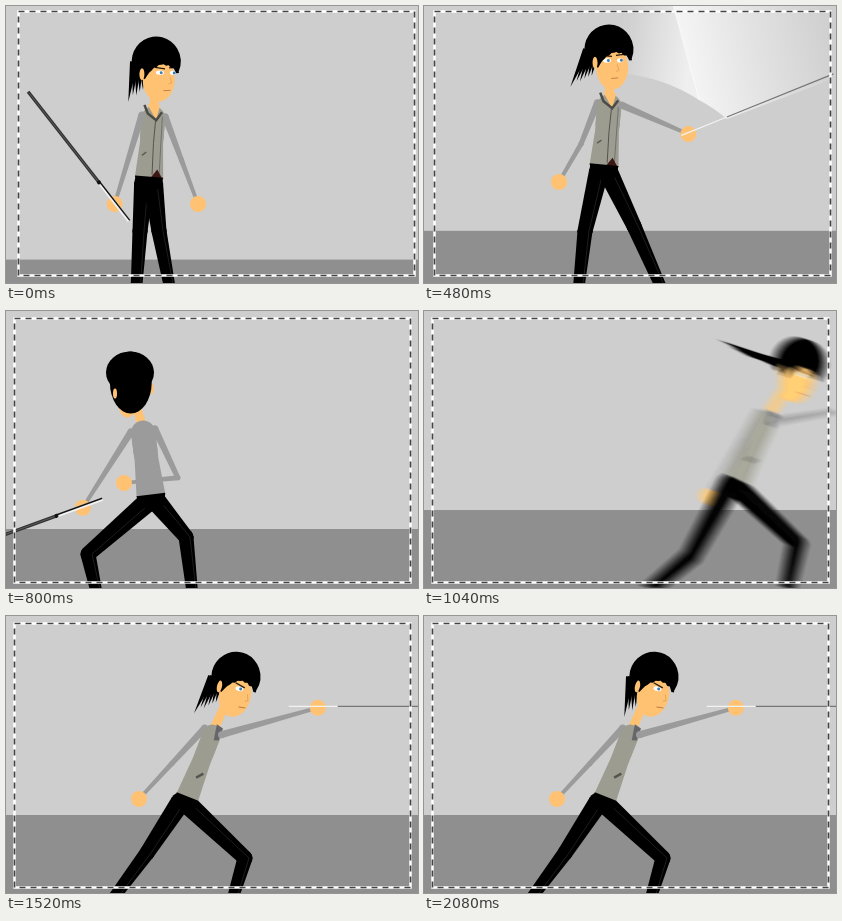
Animation, 412 px wide and 277 px high, one loop 2480 ms. Source, as an HTML page with a canvas:

```html
<!DOCTYPE html>
<html lang="en">
<head>
<meta charset="utf-8">
<title>Sword drill</title>
<style>
html, body { margin: 0; width: 100%; height: 100%; overflow: hidden; background: #cecece; }
canvas { display: block; }
</style>
</head>
<body>
<canvas id="stage" width="412" height="277"></canvas>
<script>
const W = 412, H = 277, LOOP = 2480, STEP = 80, LAST = 2080;
const SKIN = '#ffc273', INK = '#000', SLEEVE = '#9b9b9b', VEST = '#9c9c90', FLOOR = '#8f8f8f', BACK = '#cecece';
const THRUST = 1040;

const newLayer = () => Object.assign(document.createElement('canvas'), { width: W, height: H }).getContext('2d');
const stage = document.getElementById('stage').getContext('2d');
const body = newLayer(), smear = newLayer();
let c = body;

// side: which shoulder holds the sword; nod: forward lean of the head;
// arm: angle, reach; legs: knee x, y, foot x
const poses = [
  { t: 0, neck: [148, 103], waist: [143, 172], nod: 2, side: -1, arm: [107, 93], hand: [192, 198],
    left: [134, 225, 130], right: [153, 225, 165], blade: 232, floor: 253.6, tail: 94 },
  { t: 240, away: true, neck: [151, 84], waist: [151, 157], nod: 11, side: -1, arm: [125.5, 95], hand: [246, 112],
    left: [146, 215, 143], right: [222, 193, 198], blade: 155, floor: 290, tail: 94 },
  { t: 480, neck: [186, 91], waist: [180, 160], nod: -1, side: 1, arm: [383.5, 73], hand: [135, 176],
    left: [161, 225, 154], right: [210, 220, 240], blade: 338, floor: 224.8, tail: 110 },
  { t: 800, away: true, neck: [136, 112], waist: [145, 185], nod: -12, side: -1, arm: [482.4, 90], hand: [118, 172],
    left: [82, 243, 92], right: [180, 226, 187], blade: 520, floor: 218, tail: 100 },
  { t: THRUST, neck: [347, 99], waist: [313, 170], nod: 26, side: 1, arm: [351, 74], hand: [285, 186],
    left: [267, 245, 215], right: [373, 232, 361], blade: 360, floor: 199, tail: 198 },
  { t: 1520, neck: [210, 108], waist: [181, 182], nod: 18, side: 1, arm: [344.4, 100], hand: [133, 183],
    left: [141, 237, 103], right: [239, 242, 225], blade: 360, floor: 199, tail: 112 }
];

const mix = (a, b, k) => Array.isArray(a) ? a.map((v, i) => mix(v, b[i], k)) : a + (b - a) * k;
const clamp = (v, lo = 0, hi = 1) => Math.max(lo, Math.min(hi, v));
const ramp = (t, from, to) => clamp((t - from) / (to - from));
const rad = d => d * Math.PI / 180;
const polar = (d, r) => [Math.cos(rad(d)) * r, Math.sin(rad(d)) * r];
const rnd = i => Math.abs(Math.sin(i * 12.9898) * 43758.5453) % 1;

function poseAt(t) {
  const i = clamp(poses.findLastIndex(p => p.t <= t), 0, poses.length - 2);
  const a = poses[i], b = poses[i + 1];
  let k = ramp(t, a.t, b.t);
  const away = (k < 0.5 ? a : b).away;
  if (a.t === THRUST) k = 1 - (1 - k) ** 3;
  const p = { t, away };
  for (const key in a) if (key !== 't' && key !== 'away') p[key] = mix(a[key], b[key], k);
  p.tail -= 18 * ramp(t, 1680, LAST);
  p.profile = clamp(p.nod / 18);
  return p;
}

function poly(color, pts) {
  c.fillStyle = color;
  c.beginPath();
  pts.forEach(q => c.lineTo(...q));
  c.fill();
}

function oval(color, x, y, rx, ry = rx) {
  c.fillStyle = color;
  c.beginPath();
  c.ellipse(x, y, rx, ry, 0, 0, 7);
  c.fill();
}

function line(color, w, ...pts) {
  c.strokeStyle = color;
  c.lineWidth = w;
  c.beginPath();
  pts.forEach(q => c.lineTo(...q));
  c.stroke();
}

// Tapered limb through joints of the given widths
function limb(color, joints, widths) {
  joints.slice(1).forEach(([u, v], i) => {
    const [x, y] = joints[i], a = widths[i] / 2, b = widths[i + 1] / 2;
    const d = Math.hypot(u - x, v - y) || 1, nx = (y - v) / d, ny = (u - x) / d;
    poly(color, [[x + nx * a, y + ny * a], [u + nx * b, v + ny * b], [u - nx * b, v - ny * b], [x - nx * a, y - ny * a]]);
    oval(color, x, y, a);
    oval(color, u, v, b);
  });
}

// Loose strands hanging from the back of the head
function drawTail(angle) {
  const length = 36 + Math.max(0, angle - 120) * 0.2;
  for (let i = 0; i < 6; i++) {
    const x = -22 + i * 2, y = -9;
    const [dx, dy] = polar(angle - i * 2.5 + 4, length * (1 - i * 0.07 + rnd(i + 1) * 0.15));
    const [nx, ny] = polar(angle + 90, 4);
    poly(INK, [[x + nx, y + ny], [x + dx, y + dy], [x - nx, y - ny]]);
  }
}

// Dome with a swept, slightly ragged hairline
function drawHair() {
  const teeth = 14;
  c.fillStyle = INK;
  c.beginPath();
  c.ellipse(0, -9, 24.5, 25, 0, rad(148), rad(382));
  for (let i = 0; i <= teeth; i++) {
    const k = i / teeth, j = 1 - k;
    const x = 23 * j * j + 8 * j * k - 11 * k * k;
    const y = 2 * j * j - 36 * j * k + 9 * k * k;
    c.lineTo(x, y + (i % 2) * 3 * rnd(i));
  }
  c.fill();
}

function drawFace(gaze, profile) {
  const eyes = profile < 0.7 ? [gaze, gaze + 13] : [gaze + 1];
  oval(SKIN, 3, 9, 16, 22);
  eyes.forEach((x, i) => {
    oval('#fff', x, 2, 4 - i, 2.2);
    oval('#3f7fae', x + 1.3, 2, 1.5);
    line('#2a1a0c', 1.3, [x - 5 + i, -3], [x + 5 - i, -2 - i * 2 + profile * 2]);
  });
  line('#b87b43', 0.9, [gaze + 4, 20], [gaze + 11, 19.5]);
  line('#dca05c', 0.8, [gaze + 10, 6], [gaze + 12, 12], [gaze + 9, 13]);
}

function drawHead(p) {
  c.save();
  c.translate(p.neck[0] + p.nod, p.neck[1] - 38.5);
  if (p.away) {
    const turn = clamp(p.nod / 11, -0.3, 1);
    oval(SKIN, 8 * turn, 15, 10, 18);
    if (turn < 0) oval(SKIN, 20, 4, 4, 6);
    oval(INK, 0, -12, 24, 21);
    oval(INK, -6 * turn - 1, -2, 20 - turn * 3, 31);
    for (let i = 0; i < 3 && turn > 0; i++) poly(INK, [[14, -18 + i * 5], [28 - i * 2, -3 + i * 3], [10, -4 + i * 3]]);
    oval(SKIN, turn < 0 ? -15 : 4, 9, 2, 5);
  } else {
    drawTail(p.tail);
    c.rotate(p.nod * 0.012);
    drawFace(clamp(p.nod * 2, -3, 5), p.profile);
    drawHair();
    oval(SKIN, -14, 4, 2.5, 6);
  }
  c.restore();
}

function drawTorso(p, at) {
  const half = 12 - 3 * p.profile;
  const pt = (u, v) => at(u * (half + v * 2.5), v);
  const top = pt(0, 0.06), head = [p.neck[0] + p.nod, p.neck[1] - 38.5];
  limb(SKIN, [top, mix(top, head, 0.6)], [9, 9]);
  limb(p.away ? SLEEVE : VEST, [pt(0, 0.13), pt(0, 0.4)], [half * 2, half * 2]);
  poly(p.away ? SLEEVE : VEST, [pt(-1, 0.12), pt(1, 0.12), pt(0.9, 0.5), pt(1, 1), pt(-1, 1), pt(-0.9, 0.5)]);
  if (p.away) return;
  if (p.profile > 0.7) {
    poly('#66666a', [pt(0.1, 0), pt(0.9, 0.02), pt(0.9, 0.18), pt(0.4, 0.2)]);
    line('#55554f', 2.5, pt(0.1, 0.72), pt(0.6, 0.64));
    return;
  }
  poly(SKIN, [pt(-0.6, -0.06), pt(0.5, -0.06), pt(0.25, 0.16)]);
  line('#4b4b48', 2.5, pt(-0.85, -0.05), pt(-0.5, 0.07), pt(0.25, 0.16), pt(0.7, 0.04));
  line('#55554f', 1, pt(0.2, 0.16), pt(0.15, 0.5), pt(0.2, 0.95));
  line('#66666f', 0.8, pt(0.75, 0.1), pt(0.7, 0.95));
  line('#5d5d57', 1.5, pt(-0.65, 0.68), pt(-0.35, 0.63));
  poly('#3c1613', [pt(0.1, 1), pt(0.55, 0.87), pt(0.95, 1)]);
}

// A shorter reach slides the hand towards the pommel
function drawSword([x, y], angle, reach, w) {
  const grip = reach * 0.8 - 51, guard = 49 - grip;
  c.save();
  c.translate(x, y - 1.5);
  c.rotate(rad(angle));
  line('#f2f2f2', w, [-grip, 0], [guard, 0]);
  line(w > 2 ? '#333' : '#777', w, [guard, 0], [guard + 115, 0]);
  if (w > 2) {
    line('#151515', w * 0.45, [-grip, 0.9], [guard, 0.9]);
    line('#606060', 0.8, [guard, 0], [guard + 113, 0]);
    oval('#111', guard, 0, 2);
  }
  c.restore();
}

function drawBody(p) {
  c = body;
  c.clearRect(0, 0, W, H);
  const spine = [p.waist[0] - p.neck[0], p.waist[1] - p.neck[1]], len = Math.hypot(...spine);
  const [dx, dy] = spine.map(v => v / len);
  const at = (u, v) => [p.neck[0] + dy * u + spine[0] * v, p.neck[1] - dx * u + spine[1] * v];
  const half = 12 - 3 * p.profile;

  const free = at(-p.side * half, 0.1), gap = [p.hand[0] - free[0], p.hand[1] - free[1]];
  const reach = Math.hypot(...gap), bend = 1.6 * Math.max(0, 90 - reach) / reach;
  const elbow = [free[0] + gap[0] / 2 + gap[1] * bend, free[1] + gap[1] / 2 - gap[0] * bend];
  limb(SLEEVE, [free, elbow, p.hand], [7, 5, 3.5]);
  oval(SKIN, ...p.hand, 8);

  [p.left, p.right].forEach(([kx, ky, foot], i) => {
    const hip = at(i * 9 - 4.5, 1.08), joints = [hip, [kx, ky], [foot, 288]];
    limb(INK, joints, [20, 15, 11]);
    line('#1d1d1d', 1, ...joints.map(([x, y]) => [x + 4, y]));
  });
  drawTorso(p, at);
  poly(INK, [at(-half - 2.5, 0.98), at(half + 2.5, 0.98), at(12, 1.15), at(-12, 1.15)]);
  drawHead(p);

  const shoulder = at(p.side * half, 0.1), [ax, ay] = polar(...p.arm);
  const grip = [shoulder[0] + ax, shoulder[1] + ay];
  limb(SLEEVE, [shoulder, grip], [7, 3.5]);
  oval(SKIN, ...grip, 8);
  drawSword(grip, p.blade, p.arm[1], p.side < 0 ? 3.3 : 1.2);
}

// Fan of light left behind the blade
function drawSlash({ t, blade }) {
  if (Math.abs(t - 480) > STEP) return;
  const facet = (x, y, u, v, tones, path) => {
    const g = c.createLinearGradient(x, y, u, v);
    tones.forEach((s, i) => g.addColorStop(i / (tones.length - 1), s));
    c.fillStyle = g;
    c.fill(new Path2D(path));
  };
  c.save();
  c.globalAlpha = t === 480 ? 1 : 0.5;
  if (t < 480) {
    c.translate(198, 96);
    c.rotate(rad(blade - 338));
    c.translate(-198, -96);
  }
  facet(200, 45, 266, 55, ['#d0d0d0', '#e0e0e0', '#efefef'], 'M195 67Q240 71 275 94L248 -4H200Z');
  facet(262, 60, 405, 30, ['#f5f5f5', '#e2e2e2', '#d0d0d0'], 'M275 94Q290 102 303 113L406 74V-4H248Z');
  line('#fafafa', 1, [249, -2], [275, 94]);
  c.restore();
}

function drawFrame(t) {
  const x = Math.round(12 - 4 * ramp(t, 240, 800)), y = Math.round(5 + 2 * ramp(t, 480, 800));
  const stroke = (color, w) => {
    c.strokeStyle = color;
    c.lineWidth = w;
    c.strokeRect(x + 0.5, y + 0.5, 396, 264);
  };
  stroke('#fff', 2.5);
  c.setLineDash([6, 5]);
  stroke('#444', 1.7);
  c.setLineDash([]);
}

// Average of shifted copies, strongest at the thrust
function drawSmear(amount) {
  const n = 13;
  smear.clearRect(0, 0, W, H);
  smear.globalCompositeOperation = 'lighter';
  smear.globalAlpha = 1 / n;
  for (let i = 0; i < n; i++) {
    const k = (i / (n - 1) - 0.5) * amount;
    smear.drawImage(body.canvas, k * 13, k * 4);
  }
  c.drawImage(smear.canvas, 0, 0);
}

function render(t) {
  const p = poseAt(t), blur = 1 - Math.abs(t - THRUST) / 240;
  drawBody(p);
  c = stage;
  c.fillStyle = BACK;
  c.fillRect(0, 0, W, H);
  c.fillStyle = FLOOR;
  c.fillRect(0, p.floor, W, H);
  drawSlash(p);
  if (blur > 0) drawSmear(blur);
  else c.drawImage(body.canvas, 0, 0);
  drawFrame(t);
}

const start = performance.now();
function tick() {
  const t = (performance.now() - start) % LOOP;
  render(Math.min(LAST, Math.floor(t / STEP) * STEP));
  requestAnimationFrame(tick);
}
tick();
</script>
</body>
</html>
```
